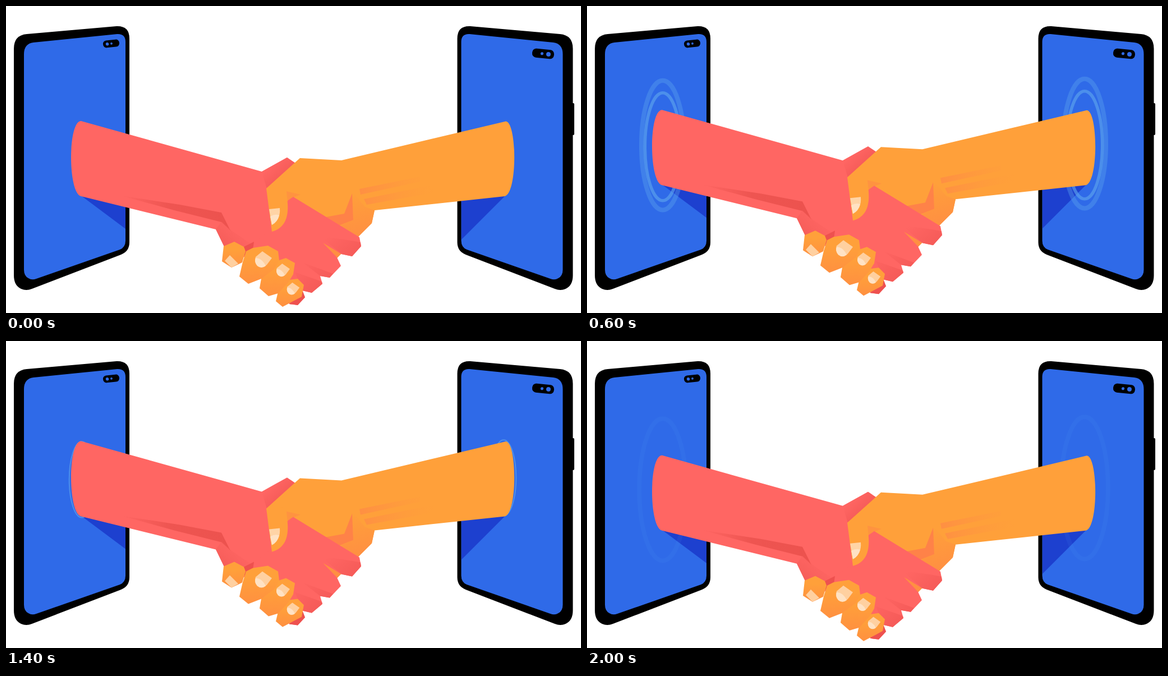
An HTML page for the animation above (2.1 s loop, 1025x547 px).

```html
<!DOCTYPE html>
<html lang="en">
<head>
<meta charset="utf-8">
<title>Handshake through phones</title>
<style>
  html, body { margin: 0; width: 100%; height: 100%; overflow: hidden; background: #fff; }
  svg { display: block; width: 100%; height: 100%; }
  .pink { fill: #ff6663; }
  .orange { fill: #ffa03a; }
  .ring { fill: none; stroke: #5fa8ee; }
</style>
</head>
<body>
<svg viewBox="0 0 1025 547">
  <defs>
    <linearGradient id="finger" x1="0" y1="0" x2="0" y2="1">
      <stop offset=".3" stop-color="#ffa03a"/><stop offset="1" stop-color="#ff9040"/>
    </linearGradient>
    <linearGradient id="palm" gradientUnits="userSpaceOnUse" x1="625" y1="330" x2="640" y2="410">
      <stop offset="0" stop-color="#ffa03a"/><stop offset="1" stop-color="#ff8f42"/>
    </linearGradient>
    <linearGradient id="streak">
      <stop offset="0" stop-color="#ff8f43"/><stop offset="1" stop-color="#ff9c3d" stop-opacity="0"/>
    </linearGradient>
    <linearGradient id="crease">
      <stop offset="0" stop-color="#ff6663"/><stop offset=".45" stop-color="#ee5551"/><stop offset="1" stop-color="#ec524e"/>
    </linearGradient>
    <linearGradient id="shade" x1="0" y1="0" x2="1" y2="1">
      <stop offset=".25" stop-color="#ff6663"/><stop offset="1" stop-color="#ec504e"/>
    </linearGradient>
    <linearGradient id="soft" x1="0" y1="1" x2="1" y2="0">
      <stop offset="0" stop-color="#ee5652"/><stop offset="1" stop-color="#ff6663" stop-opacity="0"/>
    </linearGradient>
    <g id="phone">
      <path d="M14 76Q14 52 37 50L197 36Q220 35 220 58V421Q220 437 205 443L46 504Q36 508 27 504Q14 498 14 480Z"/>
      <path fill="#2f6ae8" d="M32 86Q32 67 49 65L198 50Q213 49 213 64V418Q213 430 203 434L54 486Q46 489 40 485Q32 481 32 470Z"/>
    </g>
    <g id="nail">
      <path fill="#ffd0a0" d="M-2-15L15-3L6 9Q-2 17-11 11Q-17 4-14-5Z"/>
      <path fill="#ffe2c4" d="M-14-3Q-3-3 4 11Q-4 17-11 11Q-17 4-14-3Z"/>
    </g>
  </defs>

  <use href="#phone"/>
  <g transform="rotate(-6 187.5 67)">
    <rect x="173" y="60.500" width="29" height="13" rx="6"/>
    <g fill="#2f6ae8"><circle cx="180.500" cy="67" r="2.800"/><circle cx="188" cy="67" r="1.900"/></g>
  </g>
  <rect x="1006" y="173" width="7" height="57" rx="2"/>
  <use href="#phone" transform="translate(1024.5) scale(-1 1)"/>
  <g transform="rotate(6 957.5 85)">
    <rect x="938" y="77" width="39" height="16" rx="7"/>
    <g fill="#2f6ae8"><circle cx="967" cy="85" r="4"/><circle cx="955.500" cy="85" r="2.600"/></g>
  </g>

  <g id="moving">
    <path fill="#1d40cf" d="M134 338L213 397V340ZM890 338L812 416V340Z"/>
    <g id="rings"></g>

    <!-- pink arm -->
    <path class="pink" d="M134 205L456 295L501 270L530 290L520 420L430 446L390 431L374 398L134 339C110 334 110 204 134 205Z"/>
    <path fill="url(#shade)" d="M456 295L501 270L516 280L465 326Z"/>
    <path fill="url(#crease)" d="M205 338L310 354L384 368L400 400L384 385L300 364Z"/>
    <path fill="url(#soft)" d="M374 398L384 384L402 400L440 426L424 444L390 431Z"/>

    <!-- orange arm -->
    <path class="orange" d="M891 205.500C911 207 912 334 889 339L657 364L652 387L627 412L590 449L500 390L464 325L524 271L598 275Z"/>
    <path fill="url(#palm)" d="M617 330L640 358L657 364L652 387L627 412L590 449L560 425L598 390L619 380Z"/>
    <path fill="#ff8248" d="M565 377L603 370L617 334L619 381L594 391Z"/>
    <path fill="url(#streak)" d="M630 326L738 304V313L632 336ZM638 344L765 318V332L643 354Z"/>
    <path fill="#ff9340" d="M499 330L525 336L512 341L502 348Z"/>

    <!-- pink fingers -->
    <path class="pink" d="M512 340L630 412L633 428L617 446L598 442L565 422L590 448L597 463L577 484L560 481L564 495L545 511L528 507L533 519L520 533L505 531L490 505L440 465L418 440L470 400L502 347Z"/>
    <path fill="url(#shade)" d="M560 410L616 418L632 421L633 428L617 446L598 442ZM529 457L583 477L577 484L560 481ZM515 474L563 491L564 495L545 511L528 507Z"/>
    <path fill="#ee514f" d="M526 500L533 519L520 533L505 531ZM424 429L442 420L440 435L422 446Z"/>

    <!-- orange thumb and fingertips -->
    <path class="orange" d="M464 325L499 322Q501 338 502 351C504 378 496 396 474 402Z"/>
    <path fill="#ffd4a6" d="M469 362L488 360Q490 380 474 390Z"/>
    <path fill="#ffe2c4" d="M471 375Q480 370 487 373Q484 385 474 390Z"/>
    <g fill="url(#finger)">
      <path d="M388 428L407 420L424 429L427 437L421 457L402 466L385 455Z"/>
      <path d="M505 488L520 486L531 497L527 518L493 536L481 526L485 509Z"/>
      <path d="M484 454L499 449L515 458L512 478L503 493L485 512L468 517L452 503L456 480Z"/>
      <path d="M428 437L440 431L467 427L485 437L487 453L479 468L455 486L432 495L416 482L422 456Z"/>
    </g>
    <path fill="#ffd0a0" d="M390 454L399 444L414 459L402 466Z"/>
    <use href="#nail" x="459" y="452"/>
    <use href="#nail" transform="translate(494 471) scale(.8)"/>
    <use href="#nail" transform="translate(512 504) scale(.75)"/>
  </g>
</svg>
<script>
  const LOOP = 2100, STEP = 100;
  const moving = document.getElementById('moving');
  const ringLayer = document.getElementById('rings');

  // Two pulses per loop, each with a pair of rings around both arms.
  const rings = [0, 150, 1125, 1275].flatMap(start =>
    [[135, 273], [887, 270]].map(([cx, cy]) => {
      const el = document.createElementNS('http://www.w3.org/2000/svg', 'ellipse');
      el.setAttribute('class', 'ring');
      el.setAttribute('cx', cx);
      ringLayer.append(el);
      return { el, start, cy };
    }));

  function drawRing({ el, start, cy }, time) {
    const age = time - start;
    const visible = age > 200 && age < 800;
    el.style.display = visible ? '' : 'none';
    if (!visible) return;
    const ry = 130 - 58 * ((800 - age) / 500) ** 1.5;
    el.setAttribute('cy', cy - (age - 300) / 60);
    el.setAttribute('rx', ry * 0.33);
    el.setAttribute('ry', ry);
    el.setAttribute('stroke-width', Math.max(2, Math.min(8, (ry - 60) / 6.5)));
    el.setAttribute('opacity', Math.min(0.6, (130 - ry) / 42));
  }

  function draw(now) {
    const time = Math.floor(now % LOOP / STEP) * STEP;
    const lift = 17.1 * (1 - Math.cos((time - 22) / LOOP * 2 * Math.PI));
    moving.setAttribute('transform', `translate(0 ${-lift})`);
    rings.forEach(ring => drawRing(ring, time));
  }

  const begin = performance.now();
  function tick() {
    draw(performance.now() - begin);
    requestAnimationFrame(tick);
  }
  tick();
</script>
</body>
</html>
```
